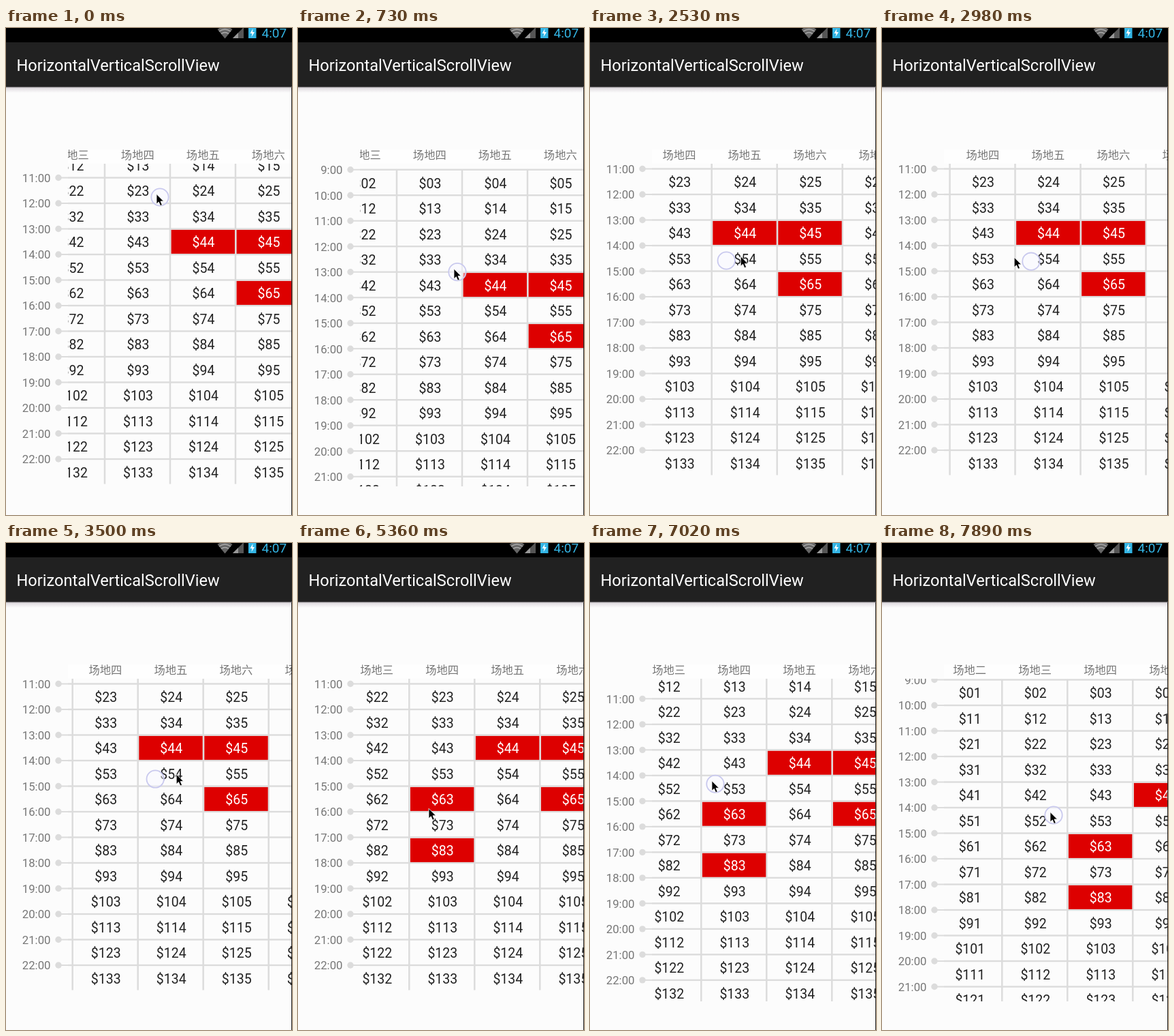
Animation, 420 px wide and 714 px high, one loop 8000 ms. Source, as an HTML page:

```html
<!DOCTYPE html>
<html lang="zh-CN">
<head>
<meta charset="utf-8">
<title>HorizontalVerticalScrollView</title>
<style>
  html, body { margin: 0; width: 100%; height: 100%; overflow: hidden; background: #fcfcfc; }
  svg { display: block; width: 100vw; height: 100vh; font-family: Roboto, sans-serif; }
  .cell { font-size: 19.5px; fill: #222; text-anchor: middle; }
  .hour { font-size: 16.8px; fill: #777; text-anchor: end; }
  .head { font: 16.3px "Noto Sans CJK SC", "Noto Sans CJK", sans-serif; fill: #777; text-anchor: middle; }
  .booked { fill: #d00; }
  .cell.on { fill: #fff; }
</style>
</head>
<body>
<svg viewBox="0 0 420 714">
  <defs>
    <linearGradient id="shade" x2="0" y2="1">
      <stop offset="0" stop-color="#aaa5aa"/>
      <stop offset=".3" stop-color="#e4e0e4"/>
      <stop offset="1" stop-color="#fcfcfc"/>
    </linearGradient>
    <clipPath id="headClip"><rect x="91" y="178" width="328" height="21"/></clipPath>
    <clipPath id="gridClip"><rect x="91" y="199" width="328" height="473"/></clipPath>
    <clipPath id="hourClip"><rect x="0" y="199" width="91" height="473"/></clipPath>
  </defs>

  <rect width="420" height="714" fill="#fcfcfc"/>
  <rect y="86" width="420" height="9" fill="url(#shade)"/>
  <rect x="91" y="178" width="328" height="21" fill="#fefefe"/>

  <g clip-path="url(#headClip)"><g id="heads"></g></g>
  <g clip-path="url(#hourClip)"><g id="hours"></g></g>
  <g clip-path="url(#gridClip)">
    <g id="rowLines"></g>
    <g id="grid"></g>
  </g>

  <rect x="419" y="87" width="1" height="627" fill="#222"/>
  <rect y="21" width="420" height="65.5" fill="#212121"/>
  <rect width="420" height="21" fill="#000"/>
  <text x="15.5" y="63.3" font-size="23.6" fill="#fff">HorizontalVerticalScrollView</text>

  <g id="status">
    <path d="M310.5 2Q321.500 -6 332.500 2L321.500 15.500Z" fill="#666"/>
    <path d="M313 5Q321.500 -1 330 5M316 8.500Q321.500 4.500 327 8.500" fill="none" stroke="#aaa" stroke-width="1.300"/>
    <path d="M333 15L349 -1V15Z" fill="#555"/>
    <path d="M333 15L341 7V15Z" fill="#999"/>
    <rect x="356" y="-2" width="11.500" height="17" fill="#33b5e5"/>
    <path d="M362.500 1L358.500 8H361.500L360.500 13L365 6H362Z" fill="#fff"/>
    <text x="375.500" y="14" font-size="19" fill="#33b5e5">4:07</text>
  </g>

  <circle id="touch" r="12.700" fill="#f8f8ff" fill-opacity=".5" stroke="#c9c9ee" stroke-width="1.800"/>
  <path id="cursor" d="M0 0V14.500L3.300 11.500L5.700 17L8.300 15.900L6 10.500H10.500Z" fill="#000" stroke="#fff" stroke-width=".8"/>
</svg>

<script>
const LOOP = 8000, COLS = 10, ROWS = 14, COL_W = 96, ROW_H = 37.5;
const GREY = '#dcdcdc';
const $ = id => document.getElementById(id);

function add(parent, tag, attrs, text) {
  const el = document.createElementNS('http://www.w3.org/2000/svg', tag);
  for (const k in attrs) el.setAttribute(k, attrs[k]);
  if (text) el.textContent = text;
  parent.appendChild(el);
  return el;
}

// Time at which each booked cell turns red
const booked = { '$44': 0, '$45': 0, '$65': 0, '$63': 4430, '$83': 4990 };
const bookings = [];

// Column 3 has its left rule at x = 0; the 9:00 rule is at y = 0.
const colX = c => (c - 3) * COL_W;

for (let c = 0; c < COLS; c++) {
  add($('heads'), 'text', { class: 'head', x: colX(c) + 48.3, y: 192 }, '场地' + '一二三四五六七八九十'[c]);
  add($('grid'), 'rect', { x: colX(c) - 1.25, y: 0, width: 2.5, height: ROWS * ROW_H - 1, fill: GREY });
}

for (let r = 0; r < ROWS; r++) {
  const y = r * ROW_H;
  add($('hours'), 'rect', { x: 77, y: y - 1, width: 14, height: 2, fill: GREY });
  add($('hours'), 'circle', { cx: 77, cy: y, r: 4.7, fill: GREY });
  add($('hours'), 'text', { class: 'hour', x: 65.5, y: y + 6.3 }, `${9 + r}:00`);
  add($('rowLines'), 'rect', { x: 91, y: y - 1.2, width: 328, height: 2.4, fill: GREY });
  for (let c = 0; c < COLS; c++) {
    const label = `$${r}${c}`;
    const box = label in booked &&
      add($('grid'), 'rect', { class: 'booked', x: colX(c) + 1.6, y: y + 1.4, width: 93.4, height: 35 });
    const text = add($('grid'), 'text', { class: 'cell', x: colX(c) + 49, y: y + 26.8 }, label);
    if (box) bookings.push({ box, text, from: booked[label] });
  }
}

// Monotone cubic through [time, value] keys: no overshoot, flat at turning points
function track(keys) {
  const slope = i => (keys[i + 1][1] - keys[i][1]) / (keys[i + 1][0] - keys[i][0]);
  const tangent = i => {
    if (i === 0 || i === keys.length - 1) return 0;
    const a = slope(i - 1), b = slope(i);
    return a * b <= 0 ? 0 : 2 * a * b / (a + b);
  };
  return t => {
    let i = 0;
    while (i < keys.length - 2 && t >= keys[i + 1][0]) i++;
    const [t0, v0] = keys[i], [t1, v1] = keys[i + 1];
    const d = t1 - t0, u = Math.min(1, Math.max(0, (t - t0) / d));
    const s = u * u * (3 - 2 * u);
    return v0 + (v1 - v0) * s + d * u * (1 - u) * ((1 - u) * tangent(i) - u * tangent(i + 1));
  };
}

const scrollX = track([
  [0, 145], [1660, 145], [1900, 136], [2270, 20], [2530, 82.5], [2760, 126],
  [3260, 62], [3500, 97.5], [3700, 140], [4070, 163.3], [7690, 163.3], [7890, 272.3], [LOOP, 272.3]
]);
const scrollY = track([
  [0, 144.5], [60, 144.5], [170, 131.5], [300, 131.5], [780, 210], [1150, 210], [1620, 131.5],
  [6060, 131.5], [6330, 210], [6560, 210], [6900, 150], [7670, 200.5], [LOOP, 200.5]
]);
const touchX = track([
  [0, 226], [60, 226], [1200, 243], [1660, 252], [1900, 243], [2270, 137], [2530, 200], [2760, 245],
  [3260, 182], [3500, 219], [3680, 270], [4070, 210], [4430, 210], [4710, 205], [4990, 205],
  [5360, 197], [5590, 203], [5710, 203], [5880, 177], [6060, 177], [6350, 205], [6900, 190],
  [7690, 145], [7890, 252], [LOOP, 252]
]);
const touchY = track([
  [0, 248], [60, 248], [170, 230], [1150, 440], [1660, 366], [1900, 364], [2530, 341], [3500, 346],
  [4070, 375], [4430, 375], [4710, 469], [4990, 469], [5360, 394], [5590, 330], [5710, 330],
  [5880, 310], [6060, 310], [6350, 402], [6470, 413], [6900, 350], [7670, 399], [LOOP, 399]
]);
// How far the cursor runs ahead of the touch ring
const lead = track([
  [0, 0], [1680, 0], [1900, -12], [2270, 0], [2530, 26], [2760, 0],
  [3000, -20], [3260, 0], [3500, 36], [3680, 0], [LOOP, 0]
]);
const presses = [[0, 3650], [4310, 4430], [4890, 4990], [5880, LOOP]];

const move = (id, x, y) => $(id).setAttribute('transform', `translate(${x.toFixed(2)} ${y.toFixed(2)})`);

function draw(t) {
  const x = scrollX(t), y = scrollY(t), tx = touchX(t), ty = touchY(t), ahead = lead(t);
  move('heads', x, 0);
  move('hours', 0, y);
  move('rowLines', 0, y);
  move('grid', x, y);
  move('touch', tx, ty);
  move('cursor', tx - 5 + ahead, ty - 4.5 - Math.abs(ahead) * 0.07);
  const down = presses.some(([a, b]) => t >= a && t < b);
  $('touch').setAttribute('visibility', down ? 'visible' : 'hidden');
  for (const { box, text, from } of bookings) {
    box.setAttribute('visibility', t >= from ? 'visible' : 'hidden');
    text.classList.toggle('on', t >= from);
  }
}

const start = performance.now();
function tick() {
  draw((performance.now() - start) % LOOP);
  requestAnimationFrame(tick);
}
tick();
</script>
</body>
</html>
```
